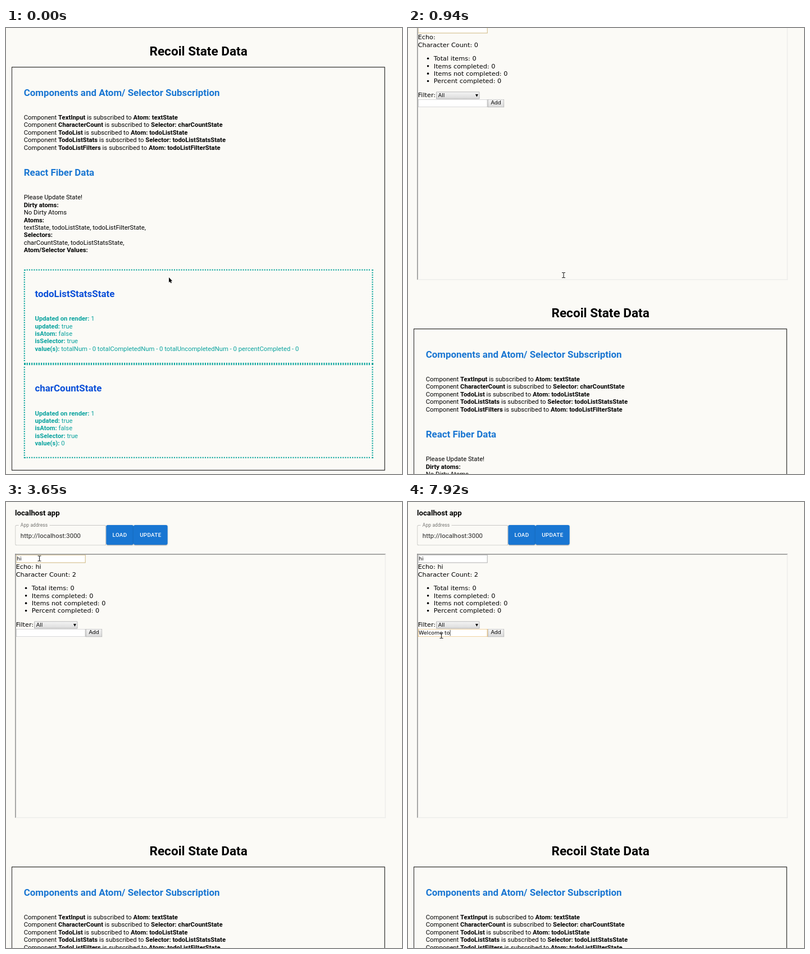
An HTML page that plays this animation: 705x794 px, repeating every 8000 ms.

```html
<!DOCTYPE html>
<html lang="en">
<head>
<meta charset="utf-8">
<title>Recoil State Data</title>
<style>
  html, body { margin: 0; width: 100%; height: 100%; overflow: hidden; background: #fbfaf6; }
  #stage { position: relative; width: 705px; height: 794px; overflow: hidden; }
  /* The page is laid out 1000px wide and shown at 70.5%; --hair is one screen pixel. */
  #page { --hair: 1.42px; position: absolute; left: 0; top: 0; width: 1000px; height: 1960px; transform-origin: 0 0;
    font: 16px/19px Roboto, sans-serif; color: #000; white-space: nowrap; }
  #page * { box-sizing: border-box; }
  .abs { position: absolute; }
  h1, h2, h3 { position: absolute; margin: 0; line-height: 28px; }
  h1 { left: 14px; top: 862px; width: 944px; font-size: 32px; line-height: 38px; text-align: center; }
  h2 { left: 45px; font-size: 24px; color: #1976d2; }
  h3 { left: 22.7px; top: 14px; font-size: 18.72px; }
  .text { position: absolute; left: 45px; }

  .address { left: 22.7px; top: 58px; width: 230px; height: 51.5px; border-radius: 4px;
    box-shadow: inset 0 0 0 var(--hair) #c8c7c4; padding: 18px 14px; letter-spacing: .00938em; color: #212121; }
  .address label { position: absolute; left: 9px; top: -8px; padding: 0 5px; background: #fbfaf6;
    font-size: 12px; line-height: 17px; color: #757471; }
  .btn { top: 58px; height: 50px; border-radius: 4px; background: #1976d2; color: #fff; text-align: center;
    font: 500 14px/50px Roboto, sans-serif; letter-spacing: .02857em;
    box-shadow: 0 3px 1px -2px rgba(0,0,0,.2), 0 2px 2px rgba(0,0,0,.14), 0 1px 5px rgba(0,0,0,.12); }

  #frame { left: 23px; top: 131px; width: 936px; height: 667px; overflow: hidden;
    border: 2px solid; border-color: #858585 #ededeb #ededeb #858585; }
  #app { font-family: "DejaVu Sans", sans-serif; }
  #app ul { margin: 16px 0; padding-left: 40px; }
  .field, .select, .add { font-size: 13.333px; box-shadow: inset 0 0 0 var(--hair) var(--edge, #b0b0b0); }
  .field { display: flex; align-items: center; width: 176px; height: 21px; padding: 0 2px; background: #fff; white-space: pre; }
  .field.dim { --edge: #cdb57c; }
  .field.on { --edge: #e0a33e; }
  .field i { width: var(--hair); height: 15px; background: #000; }
  .filter { height: 20px; line-height: 20px; }
  .select, .add { background: linear-gradient(#f5f5f5, #dadada); }
  .select { left: 46.2px; top: 168px; width: 110px; height: 19px; line-height: 19px; padding-left: 5px; border-radius: 2px; }
  .select b { position: absolute; right: 4px; font-size: 9px; font-weight: normal; }
  .add { left: 176px; top: 187px; width: 42px; height: 21px; line-height: 20px; text-align: center; }

  #panel { left: 14.2px; top: 920.6px; width: 943.2px; height: 1019.8px; box-shadow: inset 0 0 0 var(--hair) #000; }
  #cards { left: 45px; top: 1432px; width: 882px; }
  .card { position: relative; height: 238.6px; border: 3px dotted #0aa59d; color: #0aa39f; }
  .card h2 { left: 25px; top: 45px; color: #0a4fd8; }
  .card .text { left: 25px; top: 112px; }

  #cursor { position: absolute; left: 0; top: 0; overflow: visible; }
</style>
</head>
<body>
<div id="stage">
  <div id="page">
    <h3>localhost app</h3>
    <div class="abs address"><label>App address</label>http://localhost:3000</div>
    <div class="abs btn" style="left:252.5px;width:69.5px">LOAD</div>
    <div class="abs btn" style="left:322px;width:86px">UPDATE</div>

    <div class="abs" id="frame"><div id="app">
      <div class="field" id="first"><span></span><i></i></div>
      <div>Echo: <span id="echo"></span></div>
      <div>Character Count: <span id="count">0</span></div>
      <ul>
        <li>Total items: 0</li>
        <li>Items completed: 0</li>
        <li>Items not completed: 0</li>
        <li>Percent completed: 0</li>
      </ul>
      <div class="filter">Filter:</div>
      <div class="abs select">All<b>▼</b></div>
      <div class="field" id="second"><span></span><i></i></div>
      <div class="abs add">Add</div>
    </div></div>

    <h1>Recoil State Data</h1>
    <div class="abs" id="panel"></div>
    <h2 style="top:972px">Components and Atom/ Selector Subscription</h2>
    <div class="text" id="subscriptions" style="top:1039.4px"></div>
    <h2 style="top:1174px">React Fiber Data</h2>
    <div class="text" style="top:1241px">
      Please Update State!<br><b>Dirty atoms:</b><br>No Dirty Atoms<br>
      <b>Atoms:</b><br>textState, todoListState, todoListFilterState,<br>
      <b>Selectors:</b><br>charCountState, todoListStatsState,<br><b>Atom/Selector Values:</b>
    </div>
    <div class="abs" id="cards"></div>
  </div>

  <svg id="cursor" width="1" height="1">
    <path id="arrow" d="M0 0V9L2 7.2L3.4 10.2L4.9 9.5L3.5 6.6H6.2Z" stroke="#fff" stroke-width=".8" paint-order="stroke"/>
    <path id="beam" d="M-3-4.5H-1L0-4L1-4.5H3M0-4V4M-3 4.5H-1L0 4L1 4.5H3" fill="none" stroke="#222" stroke-width="1.1"/>
    <g id="ring" fill="none"><circle r="8" stroke="#000"/><circle r="7" stroke="#fff"/></g>
  </svg>
</div>

<script>
const LOOP = 8000, SCALE = 0.705;
const $ = id => document.getElementById(id);

$('subscriptions').innerHTML = [
  ['TextInput', 'Atom: textState'],
  ['CharacterCount', 'Selector: charCountState'],
  ['TodoList', 'Atom: todoListState'],
  ['TodoListStats', 'Selector: todoListStatsState'],
  ['TodoListFilters', 'Atom: todoListFilterState']
].map(([name, state]) => `Component <b>${name}</b> is subscribed to <b>${state}</b>`).join('<br>');

const card = (name, value) => {
  const rows = { 'Updated on render': 1, updated: true, isAtom: false, isSelector: true, 'value(s)': value };
  const text = Object.entries(rows).map(([key, val]) => `<b>${key}:</b> ${val}`).join('<br>');
  return `<div class="card"><h2>${name}</h2><div class="text">${text}</div></div>`;
};
const stats = ['totalNum', 'totalCompletedNum', 'totalUncompletedNum', 'percentCompleted'];
$('cards').innerHTML = card('todoListStatsState', stats.map(s => s + ' - 0').join(' ')) + card('charCountState', 0);

// Key points: [time, ...values], joined by interpolation.
const SCROLL = [[311, -580], [518, -457], [932, -114], [1277, -23], [1346, 0]];
const POINTER = [[35, 290, 444], [240, 281, 442], [932, 277, 440], [1346, 277, 440],
  [1829, 59.5, 100.5], [3780, 59.5, 100.5], [4230, 60, 257], [4510, 59.5, 238]];
const HI = [[2860, 1], [3060, 2]];
const WELCOME = [[6570, 1], [7170, 4], [7570, 8], [7920, 10]];

const CLICK_FIRST = 2070, CLICK_SECOND = 4580, BLINK = 590;
const TICK = 69, TICK_PHASE = 35;   // scrolling and pointer refresh
const FLING_END = 990, LEAD = 15;   // the embedded app runs ahead during the fast scroll
const caretResets = [CLICK_FIRST, CLICK_SECOND, ...[...HI, ...WELCOME].map(([time]) => time)];

const linear = u => u;
const smooth = u => u * u * (3 - 2 * u);
const within = (t, a, b) => t >= a && t < b;
const hold = t => Math.floor((t - TICK_PHASE) / TICK) * TICK + TICK_PHASE;

function track(keys, t, ease = linear) {
  const next = keys.findIndex(([time]) => time > t);
  if (next <= 0) return keys.at(next).slice(1);
  const [t0, ...from] = keys[next - 1], [t1, ...to] = keys[next];
  const u = ease((t - t0) / (t1 - t0));
  return from.map((v, i) => v + (to[i] - v) * u);
}

function typed(text, keys, t) {
  return t < keys[0][0] ? '' : text.slice(0, Math.floor(track(keys, t)[0] + 0.001));
}

function caretOn(t) {
  const last = Math.max(...caretResets.filter(time => time <= t));
  return t >= CLICK_FIRST && Math.floor((t - last) / BLINK) % 2 === 0;
}

const show = (el, on) => { el.style.visibility = on ? 'visible' : 'hidden'; };

function fill(field, text, caret, style) {
  field.firstChild.textContent = text;
  field.className = 'field ' + style;
  show(field.lastChild, caret);
}

function draw(t) {
  const held = hold(t);
  const y = Math.round(track(SCROLL, held)[0]);
  const lead = within(held, SCROLL[0][0], FLING_END) ? LEAD / SCALE : 0;
  $('page').style.transform = `translate(0, ${y}px) scale(${SCALE})`;
  $('app').style.transform = `translateY(${lead}px)`;

  const moved = t >= CLICK_SECOND, caret = caretOn(t);
  const word = typed('hi', HI, t);
  fill($('first'), word, caret && !moved, moved ? '' : 'dim');
  fill($('second'), typed('Welcome to', WELCOME, t), caret && moved, moved ? 'on' : '');
  $('echo').textContent = word;
  $('count').textContent = word.length;

  const [px, py] = track(POINTER, held, smooth);
  const overText = held >= 863;
  $('cursor').style.transform = `translate(${px}px, ${py}px)`;
  show($('arrow'), !overText);
  show($('beam'), overText);
  show($('ring'), within(t, CLICK_FIRST, 2120) || within(t, CLICK_SECOND, 4720));
}

const start = performance.now();
function tick() {
  draw((performance.now() - start) % LOOP);
  requestAnimationFrame(tick);
}
draw(0);
requestAnimationFrame(tick);
</script>
</body>
</html>
```
